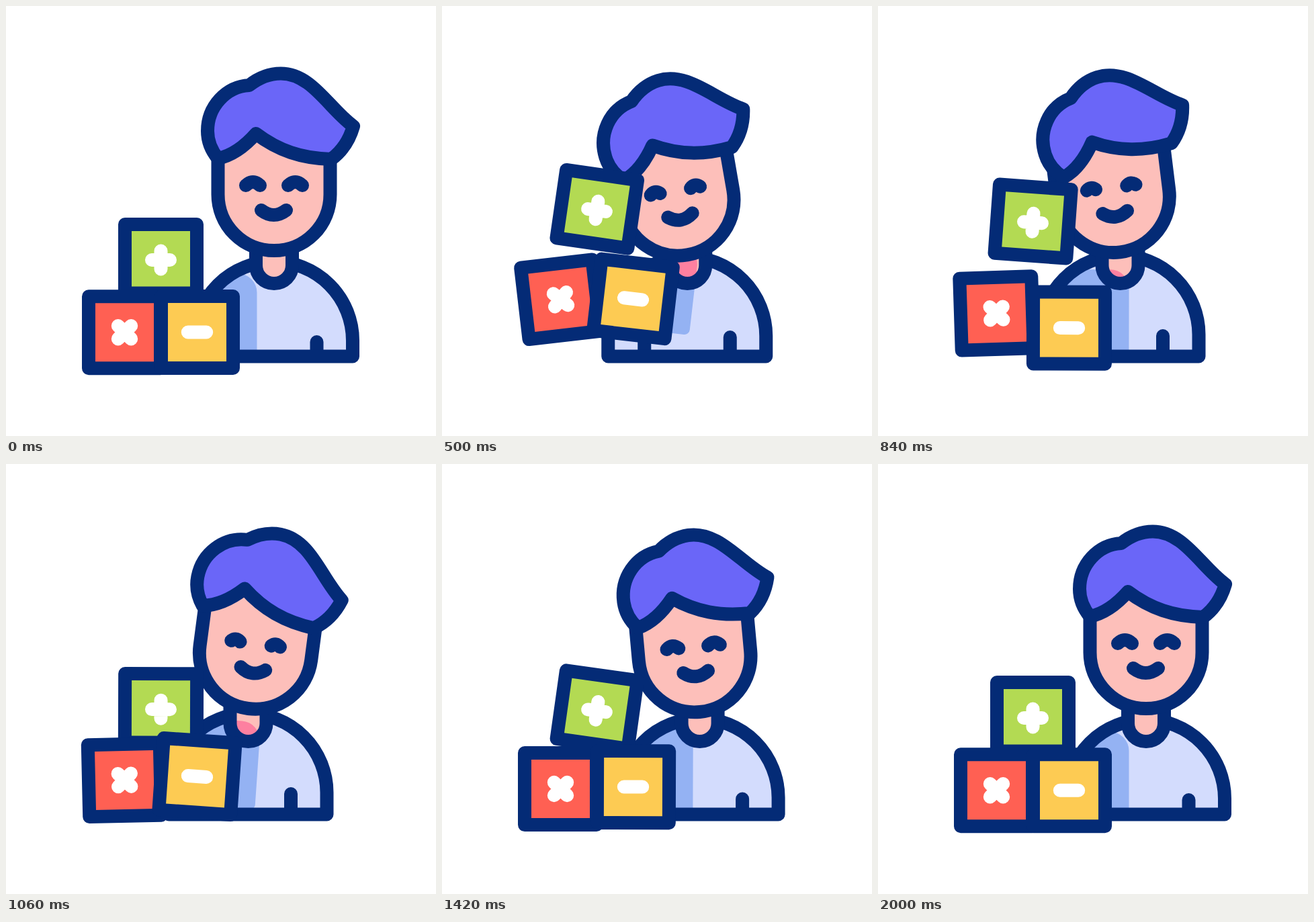
Recreate the animation shown at these times as an HTML page. Size 640 by 640 pixels, loop 3.6 s.

```html
<!DOCTYPE html>
<html lang="en">
<head>
<meta charset="utf-8">
<title>Boy with blocks</title>
<style>
  html, body { margin: 0; width: 100%; height: 100%; overflow: hidden; background: #fff; }
  svg { display: block; width: 100%; height: 100%; }
  .line { fill: none; stroke: #042b76; stroke-width: 20; stroke-linecap: round; stroke-linejoin: round; }
  .sign { fill: none; stroke: #fff; stroke-width: 20; stroke-linecap: round; }
</style>
</head>
<body>
<svg viewBox="0 0 640 640">
  <defs>
    <path id="torso"/>
    <path id="throat" d="M372 350V386a27 27 0 0 0 54 0V350"/>
    <path id="shade" d="M-38 -87H61a28 28 0 0 1 28 28V36a8 8 0 0 1 -8 8H-38Z"/>
    <clipPath id="inTorso"><use href="#torso"/></clipPath>
    <clipPath id="inThroat"><use href="#throat"/></clipPath>
  </defs>

  <g id="body">
    <use href="#torso" fill="#d3dcfd"/>
    <g clip-path="url(#inTorso)"><use class="shade" href="#shade" fill="#94b2f3"/></g>
    <path id="arms" class="line"/>
    <use class="line" href="#torso"/>
    <use href="#throat" fill="#fdbfba"/>
    <g clip-path="url(#inThroat)"><use class="shade" href="#shade" fill="#fd80a0"/></g>
    <use class="line" href="#throat"/>
  </g>

  <g id="head">
    <path d="M315.5 200V280.5a83.5 83.5 0 0 0 167 0V200" fill="#fdbfba"/>
    <path class="line" style="stroke-linecap:butt" d="M315.5 204V280.5a83.5 83.5 0 0 0 167 0V204"/>
    <path id="eyes" class="line"/>
    <path class="line" d="M380 304Q398.5 318 417 304"/>
    <path id="hair" class="line" style="fill:#6a66f8" d="M315.5 227C303 212 300 199 300 186C300 150 327 120 362 118C376 107 392 100.5 409 100.5C455 100.5 480 152 517 179C511 200 499 217 484 228C440 227 405 215 372 190C357 207 339 222 315.5 227Z"/>
  </g>

  <g id="green">
    <path class="line" style="fill:#b3da53" d="M-53.5 -53h107v102.5h-107Z"/>
    <path class="sign" d="M-13.5 0h27M0 -13.5v27"/>
  </g>
  <g id="red">
    <path class="line" style="fill:#ff6053" d="M-53.5 -53.5h107v107h-107Z"/>
    <path class="sign" d="M-9.7 -9.7l19.4 19.4M9.7 -9.7l-19.4 19.4"/>
  </g>
  <g id="yellow">
    <path class="line" style="fill:#fdcb53" d="M-53.5 -53.5h107v107h-107Z"/>
    <path class="sign" d="M-13.7 0h27.4"/>
  </g>
</svg>

<script>
const LOOP = 3600;
const HAIR_LAG = 80;
const $ = id => document.getElementById(id);
const shades = document.querySelectorAll('.shade');

const part = (t, from, to) => Math.min(1, Math.max(0, (t - from) / (to - from)));
const ease = (t, from, to) => (1 - Math.cos(Math.PI * part(t, from, to))) / 2;
const swell = (t, from, to) => Math.sin(Math.PI * part(t, from, to)) ** 2;

// The boy leans towards the blocks, swings back past upright and settles.
const slide = t => 38.5 * (ease(t, 1060, 1700) - ease(t, 100, 620));
const bob = t => 6.5 * swell(t, 0, 1060) + 5 * swell(t, 1060, 1800);
const tilt = t => -11.5 * ease(t, 80, 640) + 19.5 * ease(t, 720, 1100)
  - 13.3 * ease(t, 1100, 1440) + 5.3 * ease(t, 1440, 1900);

// A ballistic jump that tips the block and sets it straight again.
const hop = (from, to, height, angle) => t => {
  const u = part(t, from, to);
  return { lift: 4 * height * u * (1 - u), turn: angle * swell(t, from, to) };
};

const blocks = {
  green: { x: 230.5, y: 378, hops: [hop(18, 1110, 75, 8.5), hop(1110, 1720, 10.7, 8)] },
  red: { x: 176.5, y: 485.7, hops: [hop(140, 985, 50, -7), hop(985, 1430, 27, -5)] },
  yellow: { x: 284.5, y: 485.7, hops: [hop(0, 870, 51, 7), hop(870, 1455, 23.5, 5.4)] }
};

const place = (node, value) => node.setAttribute('transform', value);
const shape = (id, d) => $(id).setAttribute('d', d);
const eye = (x, half) => `M${x - half} 267q${half} ${-half * 0.95} ${half * 2} 0`;

function drawBoy(t, x) {
  const rise = 9 * (x / 38.5) ** 2, half = 10.5 + x * 0.1;
  place($('body'), `translate(${x} 0)`);
  shape('torso', `M281 521.5V${498 - rise}a117.5 117.5 0 0 1 235 0V521.5Z`);
  shape('arms', `M335 ${500 - rise}V521M462.5 ${500 - rise}V521`);
  place($('head'), `translate(${x} ${bob(t)}) rotate(${tilt(t)} 399 364)`);
  place($('hair'), `rotate(${tilt(t - HAIR_LAG)} 408 165)`);
  shape('eyes', eye(367.5, half) + eye(430.5 + x * 0.08, half));
}

function drawBlocks(t, x) {
  for (const [id, b] of Object.entries(blocks)) {
    let y = b.y, turn = 0;
    for (const jump of b.hops) {
      const pose = jump(t);
      y -= pose.lift;
      turn += pose.turn;
    }
    place($(id), `translate(${b.x} ${y}) rotate(${turn})`);
    if (id === 'yellow') {
      shades.forEach(s => place(s, `translate(${b.x - x} ${y}) rotate(${turn})`));
    }
  }
}

function tick() {
  const t = performance.now() % LOOP, x = slide(t);
  drawBoy(t, x);
  drawBlocks(t, x);
  requestAnimationFrame(tick);
}
tick();
</script>
</body>
</html>
```
